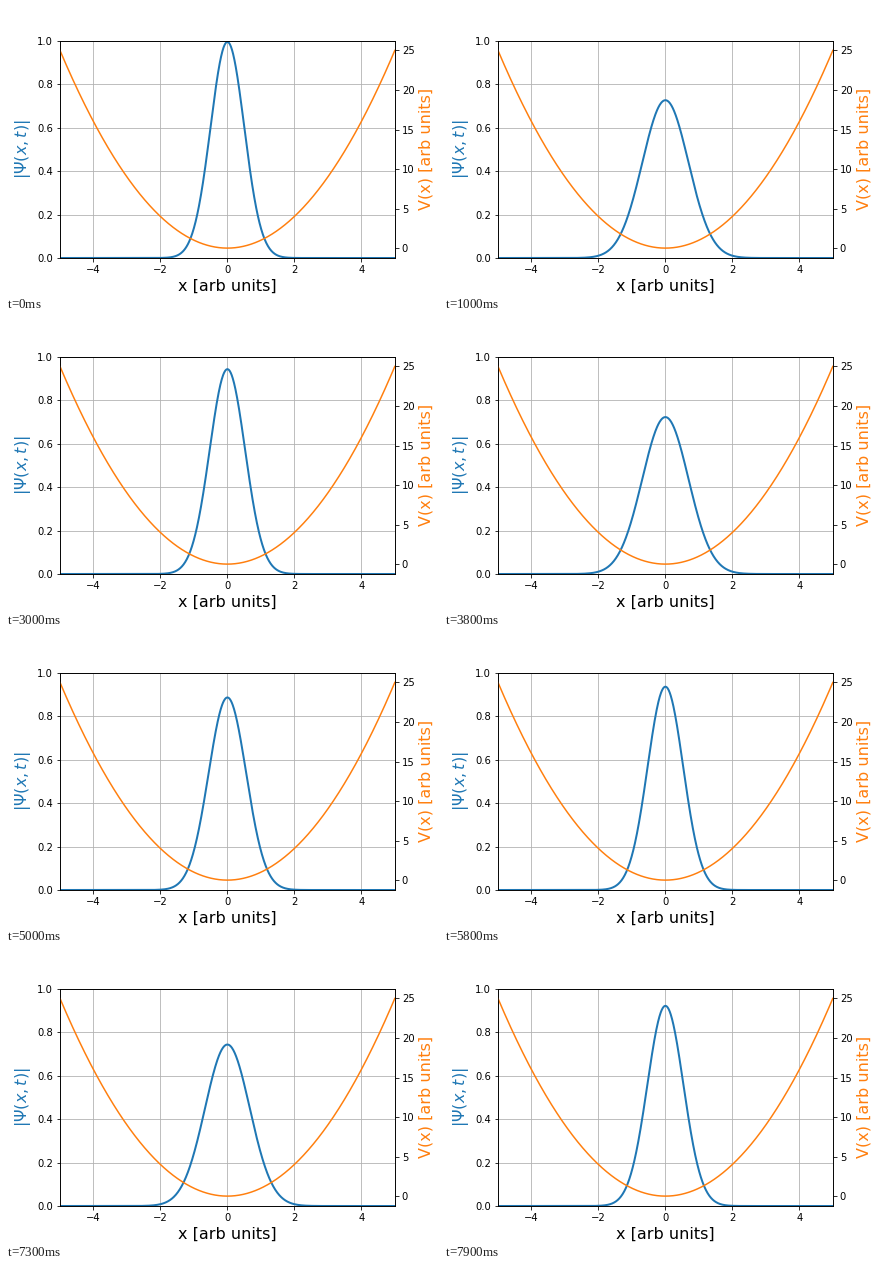
These frames come from a looping animation (432x288 px, 8 s). A matplotlib script:

```python
import numpy as np
import matplotlib.pyplot as plt
from matplotlib.animation import FuncAnimation

FRAMES = 80
INTERVAL = 100      # ms
PHASE_STEP = 0.1127  # oscillator phase per frame
LOSS = 1.2e-4       # norm lost per frame

BLUE, ORANGE = "tab:blue", "tab:orange"
LABEL_SIZE = 16

x = np.linspace(-5, 5, 1001)


def density(frame):
    """Breathing Gaussian packet in the harmonic well V = x^2."""
    width2 = 1 + np.sin(PHASE_STEP * (frame + 1)) ** 2
    norm = 1 - LOSS * frame
    return norm / np.sqrt(width2) * np.exp(-2 * x**2 / width2)


plt.rcParams["font.family"] = "DejaVu Sans"
fig = plt.figure(figsize=(6, 4), dpi=72, facecolor="white")
ax = fig.add_axes([0.125, 0.125, 0.775, 0.755])
ax.set(xlim=(-5, 5), ylim=(0, 1))
ax.set_xlabel("x [arb units]", fontsize=LABEL_SIZE)
ax.set_ylabel(r"$|\Psi(x,t)|$", fontsize=LABEL_SIZE, color=BLUE)
ax.grid(True)
packet, = ax.plot(x, density(0), color=BLUE, lw=2)

well = ax.twinx()
well.plot(x, x**2, color=ORANGE, lw=1.5)
well.set_ylim(-1.25, 26.25)
well.set_ylabel("V(x) [arb units]", fontsize=LABEL_SIZE, color=ORANGE)


def update(frame):
    packet.set_ydata(density(frame))
    return packet,


anim = FuncAnimation(fig, update, frames=FRAMES, interval=INTERVAL,
                     repeat=True, repeat_delay=0, blit=False)
plt.show()
```
